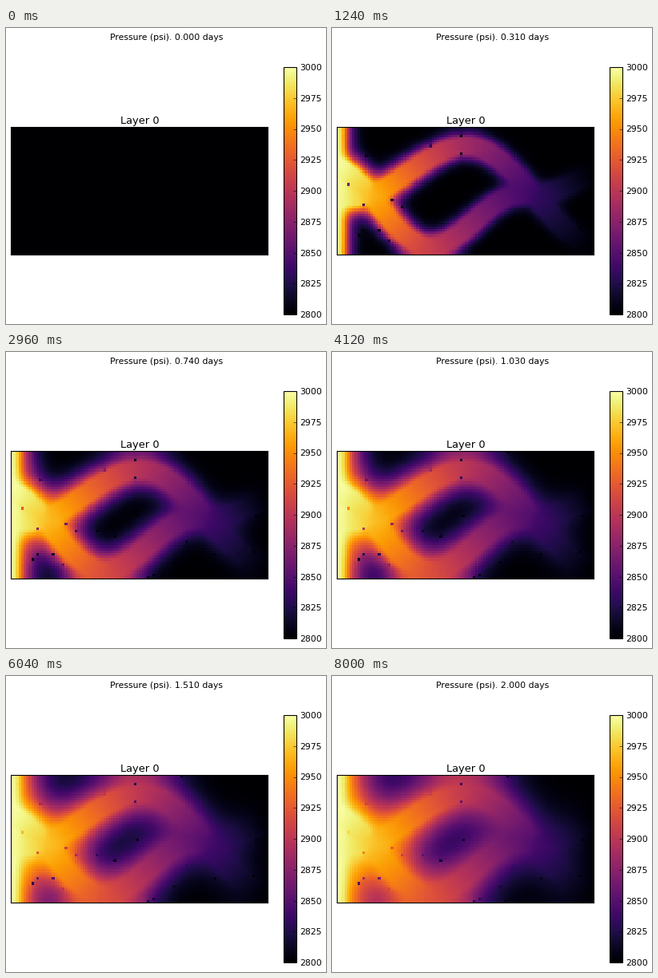
A matplotlib script that plays this animation: 400x371 px, repeating every 8040 ms.

```python
import matplotlib.pyplot as plt
import numpy as np
from matplotlib.animation import FuncAnimation

W, H, DPI = 400, 371, 100
FRAMES, INTERVAL = 201, 40
NX, NY = 100, 50
LEFT, TOP, WIDE, TALL = 6, 124, 321, 160
P_MIN, P_MAX = 2800, 3000
DAY_STEP, SUBSTEPS = 0.01, 4
D_CHANNEL, RADIUS = 40000, 9

# Turning points of the two channels, in stage pixels
UPPER = (25, 213), (168, 148), (340, 275)
LOWER = (-5, 172), (122, 274), (235, 209), (255, 209), (345, 180)


def px(x, y):
    return x / W, 1 - y / H


def box(x, y, w, h):
    return [x / W, 1 - (y + h) / H, w / W, h / H]


def distance(turns, gx, gy):
    """Distance of every cell from a curve eased between turning points."""
    tx, ty = np.array(turns).T
    x = np.arange(-10, 345)
    leg = np.interp(x, tx, np.arange(len(tx)))
    part = leg % 1
    eased = leg - part + (1 - np.cos(np.pi * part)) / 2
    y = np.interp(eased, np.arange(len(ty)), ty)
    d2 = (gx[..., None] - x) ** 2 + (gy[..., None] - y) ** 2
    return np.sqrt(d2.min(axis=-1))


def diffusivity():
    rng = np.random.default_rng(4)
    gx, gy = np.meshgrid(LEFT + WIDE * (np.arange(NX) + 0.5) / NX,
                         TOP + TALL * (np.arange(NY) + 0.5) / NY)
    rock = 18 + 8 * np.exp(-((gx - LEFT) / 70) ** 2)
    rock *= np.exp(rng.normal(0, 0.15, rock.shape))
    rock[:, :2] = 150
    d = np.minimum(distance(UPPER, gx, gy), distance(LOWER, gx, gy))
    sand = np.exp(-(d / RADIUS) ** 4)
    k = rock * (D_CHANNEL / rock) ** sand
    # A few nearly sealed cells in the rock
    sealed = (rng.random(k.shape) < 0.007) & (d > RADIUS)
    k[sealed] = 10 ** rng.uniform(-1.6, -0.5, sealed.sum())
    return k


def harmonic(a, b):
    return 2 * a * b / (a + b)


def simulate():
    """Implicit diffusion from left to right, solved column by column."""
    dt = DAY_STEP / SUBSTEPS
    k = np.pad(diffusivity().T, ((1, 1), (0, 0)), mode="edge")
    cx = dt * harmonic(k[1:], k[:-1])
    cy = dt * harmonic(k[1:-1, 1:], k[1:-1, :-1])

    inverse = []
    for i in range(NX):
        side = np.diag(cy[i], 1) + np.diag(cy[i], -1)
        a = np.diag(1 + cx[i] + cx[i + 1] + side.sum(axis=0)) - side
        if i:
            a -= cx[i][:, None] * inverse[-1] * cx[i]
        inverse.append(np.linalg.inv(a))

    u = np.zeros((NX, NY))
    fields = [u.T.copy()]
    for _ in range(FRAMES - 1):
        for _ in range(SUBSTEPS):
            u[0] += cx[0]
            for i in range(1, NX):
                u[i] += cx[i] * (inverse[i - 1] @ u[i - 1])
            u[-1] = inverse[-1] @ u[-1]
            for i in range(NX - 2, -1, -1):
                u[i] = inverse[i] @ (u[i] + cx[i + 1] * u[i + 1])
        fields.append(u.T.copy())
    return P_MIN + (P_MAX - P_MIN) * np.array(fields)


plt.rcParams.update({"font.family": "DejaVu Sans", "font.size": 7.85,
                     "axes.linewidth": 0.78})
fields = simulate()

fig = plt.figure(figsize=(W / DPI, H / DPI), dpi=DPI, facecolor="white")
ax = fig.add_axes(box(LEFT, TOP, WIDE, TALL))
ax.set(xticks=[], yticks=[])
image = ax.imshow(fields[0], cmap="inferno", vmin=P_MIN, vmax=P_MAX,
                  interpolation="nearest", aspect="auto")

cax = fig.add_axes(box(347, 49, 16, 310))
bar = fig.colorbar(image, cax=cax, ticks=np.arange(P_MIN, P_MAX + 1, 25))
bar.ax.tick_params(direction="in", length=3.1, width=0.4, pad=3.1)
bar.outline.set_linewidth(0.78)

title = fig.text(*px(200.5, 15), "", ha="center", va="baseline")
fig.text(*px(167, 120), "Layer 0", ha="center", va="baseline", fontsize=9.36)


def update(i):
    image.set_data(fields[i])
    title.set_text(f"Pressure (psi). {i * DAY_STEP:.3f} days")
    return image, title


anim = FuncAnimation(fig, update, frames=FRAMES, interval=INTERVAL,
                     repeat=True, repeat_delay=0, blit=False)
plt.show()
```
